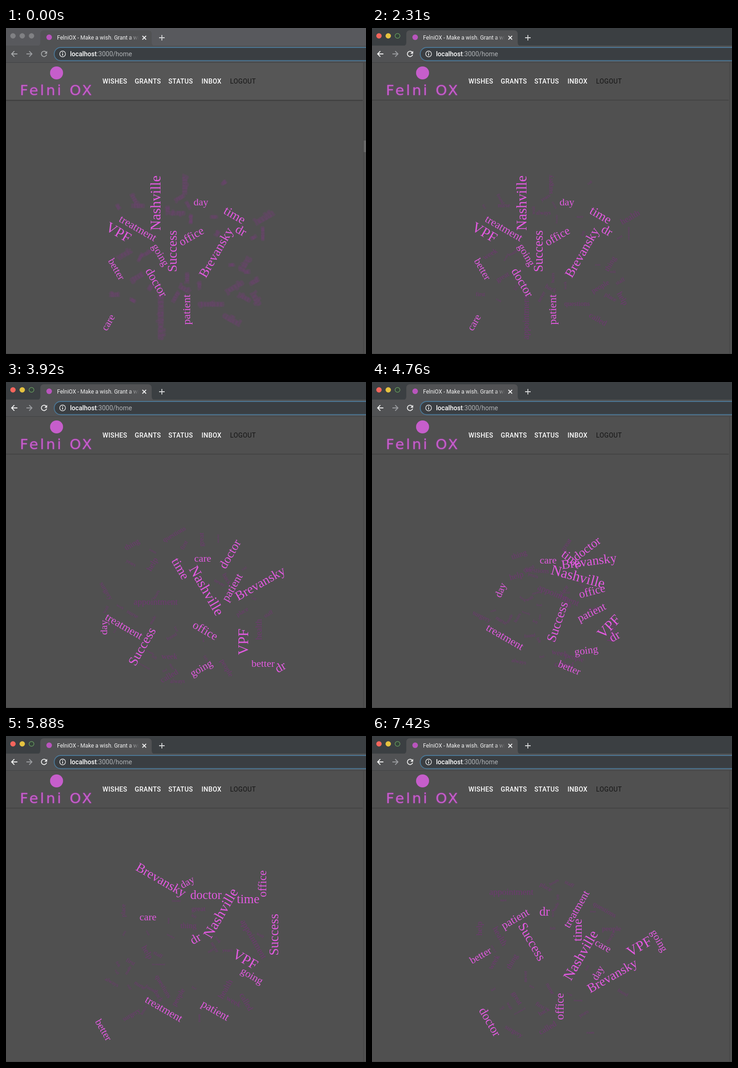
An HTML page that plays this animation: 776x704 px, repeating every 7490 ms.

```html
<!DOCTYPE html>
<html lang="en">
<head>
<meta charset="utf-8">
<title>Word cloud</title>
<style>
  html, body { margin: 0; width: 100%; height: 100%; overflow: hidden; background: #505050; }
  svg { display: block; width: 776px; height: 704px; }
  .ui { font-family: Roboto, Arial, sans-serif; }
  .nav { font-size: 14px; font-weight: 500; letter-spacing: .4px; fill: #fff; }
  .brand { font: 31px "DejaVu Sans", sans-serif; letter-spacing: 4.2px; fill: #c65ecb; text-shadow: 0 0 3px #a03ca8; }
  .icon { fill: none; stroke-width: 1.8; }
  #cloud { font-family: "Liberation Serif", "Times New Roman", serif; text-anchor: middle; }
  .bright { fill: #e25ae0; }
  .faint { fill: #7a307d; stroke: #7a3f7c; stroke-width: 5px; stroke-linejoin: round; }
</style>
</head>
<body>
<svg viewBox="0 0 776 704">
  <defs>
    <linearGradient id="fade">
      <stop offset=".88" stop-color="#f2f2f2"/>
      <stop offset="1" stop-color="#f2f2f2" stop-opacity="0"/>
    </linearGradient>
    <clipPath id="tabClip"><rect x="108" y="8" width="178" height="26"/></clipPath>
  </defs>
  <rect width="776" height="704" fill="#505050"/>

  <g class="ui">
    <rect id="strip" width="776" height="39"/>
    <path d="M66 39q8 0 8-8V13q0-8 8-8H306q8 0 8 8V31q0 8 8 8z" fill="#515254"/>
    <rect y="38" width="776" height="36" fill="#515254"/>
    <rect id="header" y="75" width="770" height="80"/>
    <rect y="74" width="776" height="1" fill="#404143"/>
    <g id="lights">
      <circle cx="15" cy="17" r="5.800"/>
      <circle cx="35" cy="17" r="5.800"/>
      <circle cx="55" cy="17" r="5.200" stroke-width="1.200"/>
    </g>
    <circle cx="93" cy="20" r="6" fill="#b955bd"/>
    <g clip-path="url(#tabClip)">
      <text x="110" y="25" font-size="12" fill="url(#fade)">FelniOX - Make a wish. Grant a wi</text>
    </g>
    <path class="icon" stroke="#f0f0f0" d="M294 17l8 8M302 17l-8 8"/>
    <path class="icon" stroke="#d8d9da" d="M330 21h12M336 15v12"/>
    <path class="icon" id="back" d="M24.500 56H12.500M18 50l-6 6 6 6"/>
    <path class="icon" stroke="#9b9da0" d="M44 56h12M50 50l6 6-6 6"/>
    <g id="reload">
      <path class="icon" d="M86.500 52.200A5.800 5.800 0 1 0 87.600 57.500"/>
      <path stroke="none" d="M88.700 49.500v6h-6z"/>
    </g>
    <rect x="104" y="42" width="700" height="28.500" rx="14" fill="#3a3e42" stroke="#4c7897" stroke-width="1.800"/>
    <circle class="icon" cx="122" cy="56" r="6.200" stroke="#e8e8e8" style="stroke-width:1.400"/>
    <path class="icon" stroke="#e8e8e8" d="M122 55v4.500M122 52v1.700"/>
    <text x="138" y="61" font-size="14" fill="#b0b3b6"><tspan fill="#fff" font-weight="500">localhost</tspan>:3000/home</text>

    <circle cx="109" cy="97" r="14" fill="#c65ecb"/>
    <text class="brand" x="30" y="145">Felni OX</text>
    <g class="nav">
      <text x="208" y="120">WISHES</text>
      <text x="277.500" y="120">GRANTS</text>
      <text x="350" y="120">STATUS</text>
      <text x="421.500" y="120">INBOX</text>
      <text x="483" y="120" fill="#141414" font-weight="400">LOGOUT</text>
    </g>
    <rect id="rule" y="155" width="769" fill="#404040"/>
    <rect x="770" y="75" width="1" height="629" fill="#434343"/>
    <rect id="thumb" x="771" y="243" width="5" height="25" fill="#686868"/>
    <rect y="703" width="776" height="1" fill="#414141"/>
  </g>
  <g id="cloud"></g>
</svg>
<script>
const LOOP = 7490, MOVE = 1000, FIRST = 2762, EVERY = 1545, LAYOUTS = 4;
const LIGHTS_ON = 420, FOCUS_ON = 1050, SOFT_END = 1500;
const $ = id => document.getElementById(id);
const set = (el, props) => { for (const k in props) el.setAttribute(k, props[k]); };
const clamp = v => Math.min(1, Math.max(0, v));
const ease = u => u < .5 ? 4 * u ** 3 : 1 - 4 * (1 - u) ** 3;

let seed = 11;
const rand = () => (seed = seed * 16807 % 2147483647) / 2147483647;

// A pose is the centre of a word; words lie only on 30 degree turns.
const turned = deg => (x, y) => ({ x, y, deg });
const [up, climb, rise, flat, fall, dive] = [-90, -60, -30, 0, 30, 60].map(turned);

const words = [];
const pen = document.createElement("canvas").getContext("2d");

function makeWord(kind, text, size) {
  const el = document.createElementNS("http://www.w3.org/2000/svg", "text");
  el.textContent = text;
  set(el, { class: kind, "font-size": size });
  pen.font = `${size}px "Liberation Serif", "Times New Roman", serif`;
  const m = pen.measureText(text);
  const lift = (m.actualBoundingBoxAscent - m.actualBoundingBoxDescent) / 2;
  return { el, kind, size, lift, half: m.width / 2 };
}

function addWord(word, poses) {
  word.poses = poses;
  word.anchors = poses.map(({ x, y, deg }) => {
    const a = deg * Math.PI / 180;
    return [x - word.lift * Math.sin(a), y + word.lift * Math.cos(a), deg];
  });
  words.push(word);
}

function bright(text, size, ...poses) {
  const word = makeWord("bright", text, size);
  $("cloud").append(word.el);
  addWord(word, poses);
}

// True when the point is clear of every word already placed in the layout.
const isFree = (x, y, layout, room) => words.every(w => {
  const p = w.poses[layout], a = p.deg * Math.PI / 180, dx = x - p.x, dy = y - p.y;
  const along = dx * Math.cos(a) + dy * Math.sin(a);
  const across = dy * Math.cos(a) - dx * Math.sin(a);
  return Math.abs(along) > w.half + room || Math.abs(across) > w.size / 2 + room;
});

function scatter(layout, word) {
  let x, y, tries = 0;
  do {
    const a = rand() * 2 * Math.PI, r = .3 + .7 * rand();
    x = 390 + 185 * r * Math.cos(a);
    y = 485 + 175 * r * Math.sin(a);
  } while (!isFree(x, y, layout, word.half * .6) && ++tries < 40);
  return { x, y, deg: 30 * Math.floor(rand() * 6) - 90 };
}

function faint(text, size) {
  const word = makeWord("faint", text, size);
  $("cloud").prepend(word.el);
  addWord(word, Array.from({ length: LAYOUTS }, (_, i) => scatter(i, word)));
}

bright("Nashville", 31, up(322, 378), dive(433, 450), climb(462, 382), climb(449, 473));
bright("VPF", 31, fall(243, 441), up(511, 561), fall(516, 482), rise(576, 454));
bright("Success", 28.5, up(358, 482), climb(293, 571), up(578, 429), dive(345, 444));
bright("Brevansky", 28, climb(455, 486), rise(549, 437), fall(333, 313), rise(519, 520));
bright("time", 27.5, fall(493, 404), dive(376, 403), flat(522, 352), up(443, 419));
bright("dr", 27, fall(507, 437), rise(591, 615), rise(408, 437), flat(372, 378));
bright("doctor", 26.5, dive(325, 549), climb(482, 371), flat(431, 342), dive(255, 617));
bright("office", 25, rise(399, 449), fall(430, 536), up(552, 319), up(404, 584));
bright("patient", 24, up(392, 608), climb(490, 445), fall(450, 595), rise(310, 397));
bright("treatment", 23.5, fall(284, 433), fall(254, 528), fall(340, 590), climb(441, 374));
bright("going", 22.5, dive(331, 491), rise(422, 620), fall(529, 520), dive(617, 443));
bright("better", 22, dive(238, 521), flat(554, 608), dive(210, 635), rise(234, 474));
bright("day", 22, flat(420, 378), up(213, 530), rise(392, 318), climb(489, 513));
bright("care", 22, climb(222, 637), flat(424, 383), flat(306, 393), fall(497, 455));

const minor = "appointment health help called thing week people great questions surgery back place first "
  + "nurse staff always never years found wait hours made felt left sure work room call told feel "
  + "visit kind pain needed friendly recommend";
minor.split(" ").forEach((text, i) => faint(text, 19 * .967 ** i));

function drawWindow(t) {
  const lit = t >= LIGHTS_ON, active = t >= FOCUS_ON;
  const grey = "#808184", ink = active ? "#f4f4f4" : "#a9abad";
  const [red, amber, green] = $("lights").children;
  set(red, { fill: lit ? "#f4655c" : grey });
  set(amber, { fill: lit ? "#e6c340" : grey });
  set(green, { fill: lit ? "#34433a" : grey, stroke: lit ? "#6fa765" : grey });
  set($("strip"), { fill: active ? "#3b3f42" : "#58595d" });
  set($("header"), { fill: active ? "#505050" : "#565656" });
  set($("back"), { stroke: ink });
  set($("reload"), { stroke: ink, fill: ink });
  set($("rule"), { height: lit ? 1.5 : 2.5 });
  set($("thumb"), { opacity: lit ? 0 : 1 });
}

function drawWords(t) {
  const step = Math.min(LAYOUTS - 2, Math.max(0, Math.floor((t - FIRST) / EVERY)));
  const p = ease(clamp((t - FIRST - step * EVERY) / MOVE));
  const soft = .24 * (1 - clamp(t / SOFT_END));
  for (const { el, kind, anchors } of words) {
    const next = anchors[step + 1];
    const [x, y, deg] = anchors[step].map((v, i) => v + (next[i] - v) * p);
    set(el, { transform: `translate(${x} ${y}) rotate(${deg})` });
    if (kind === "faint") set(el, { "stroke-opacity": soft, "fill-opacity": .75 - 2 * soft });
  }
}

const began = performance.now();
function frame() {
  const t = (performance.now() - began) % LOOP;
  drawWindow(t);
  drawWords(t);
  requestAnimationFrame(frame);
}
frame();
</script>
</body>
</html>
```
